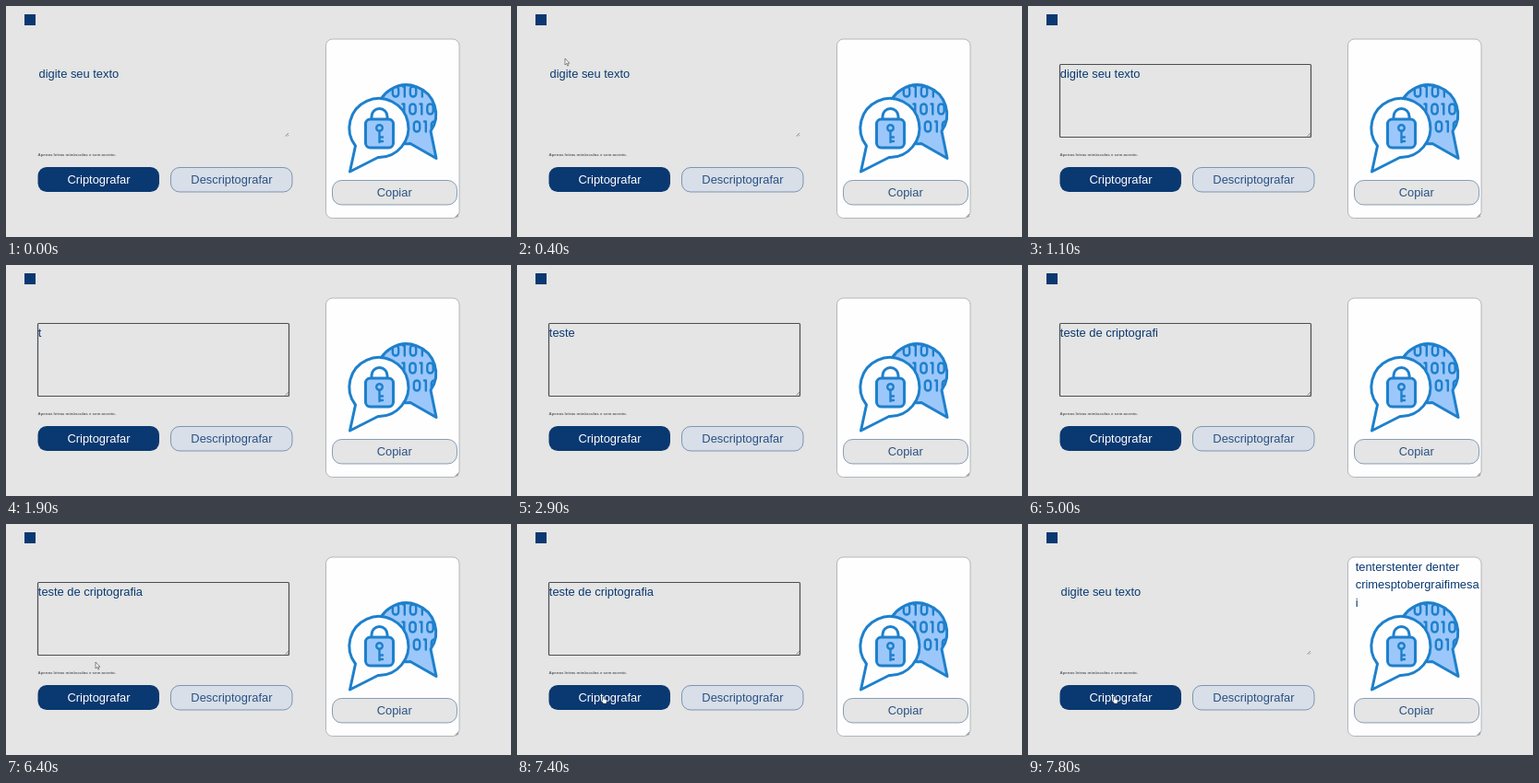
These frames come from a looping animation (547 px wide and 251 px high, 8000 ms). An HTML page:

```html
<!DOCTYPE html>
<html lang="pt">
<head>
<meta charset="utf-8">
<title>Criptografar texto</title>
<style>
  html, body { margin: 0; width: 100%; height: 100%; overflow: hidden; background: #e4e5e4; }
  svg { display: block; width: 547px; height: 251px; }
  text { font: 12.9px "Liberation Sans", Arial, sans-serif; fill: #0a3871; }
  .mid { text-anchor: middle; }
  .soft { fill: #2a5084; }
  .note { font-size: 4.4px; font-weight: bold; fill: #5b6068; }
  .art { stroke: #1e80cc; stroke-width: 3; stroke-linejoin: round; stroke-linecap: round; }
  .thin { stroke-width: 2.4; fill: none; }
  .grip { stroke: #77797c; stroke-width: .8; fill: none; }
  .outline { stroke: #0a3871; stroke-width: .7; stroke-opacity: .65; }
</style>
</head>
<body>
<svg viewBox="0 0 547 251">
  <defs>
    <path id="backBubble" d="M438 149.500A32 32 0 1 1 460 136L466 165.500Z"/>
    <clipPath id="inBack"><use href="#backBubble"/></clipPath>
  </defs>
  <rect width="547" height="251" fill="#e4e5e4"/>
  <rect x="20" y="9" width="12" height="12" fill="#0a3871"/>

  <rect id="focus" x="34.500" y="63.500" width="272" height="79" rx="1" fill="none" stroke="#4c4d4f" stroke-width="1.200"/>
  <path class="grip" d="M302.500 141.500l3.500-3.500M304.700 141.500l1.300-1.300"/>
  <text id="entry" y="78"></text>
  <text class="note" x="34.500" y="162.600">Apenas letras minúsculas e sem acento.</text>

  <rect x="34.500" y="175" width="131.500" height="27" rx="9.500" fill="#0a3871"/>
  <text class="mid" x="100.500" y="192.600" style="fill:#fff">Criptografar</text>
  <rect class="outline" x="178.500" y="175.500" width="131.500" height="26.500" rx="9.500" fill="#d8dfe8"/>
  <text class="mid soft" x="244.400" y="192.600">Descriptografar</text>

  <rect x="346.500" y="36" width="144.500" height="194.500" rx="7" fill="#fefefe" stroke="#a4a8ae" stroke-width=".8"/>
  <path class="grip" d="M486.500 229.500l3.500-3.500M488.500 229.500l1.500-1.500"/>

  <g class="art">
    <use href="#backBubble" fill="#9cc7fa"/>
    <g id="bits" class="thin" clip-path="url(#inBack)"></g>
    <path fill="#fefefe" d="M378.500 152A32 32 0 1 1 403 164.500L372.500 180Z"/>
    <path fill="none" d="M396 122v-2a8.500 8.500 0 0 1 17 0v2"/>
    <rect x="389.500" y="123" width="30" height="31" rx="5" fill="#9cc7fa"/>
    <circle class="thin" cx="404.500" cy="132.500" r="3.300"/>
    <path class="thin" d="M404.500 136v12M405 142.500h3M405 147h3"/>
  </g>

  <g id="result">
    <text x="354.700" y="50.500">tenterstenter denter</text>
    <text x="354.700" y="70">crimesptobergraifimesa</text>
    <text x="354.700" y="89.500">i</text>
  </g>
  <rect class="outline" x="353.500" y="189.500" width="135" height="26.500" rx="10" fill="#e4e5e4"/>
  <text class="mid soft" x="420.700" y="206.700">Copiar</text>

  <path id="arrow" d="M0 0v7l1.600-1.500 1.200 2.600 1.100-.5-1.200-2.500h2.200z" fill="#f4f4f4" stroke="#444" stroke-width=".6"/>
  <path id="hand" d="M1.200.8q.8-.8 1.500 0v2.400l2.600.7q.8.3.6 1.200l-.7 3h-3.200l-2-2.800q0-1 1.200-.4z" fill="#fff" stroke="#222" stroke-width=".4"/>
</svg>
<script>
const LOOP = 8000, FOCUS = 1100, TYPING = 1900, SUBMIT = 7800;
const PLACEHOLDER = "digite seu texto";
const MESSAGE = "teste de criptografia";
// [time, characters typed]
const KEYS = [
  [1900, 1], [2000, 2], [2600, 3], [2900, 5], [3200, 7], [3300, 8],
  [3500, 10], [3600, 11], [3700, 12], [3800, 13], [4100, 14], [4200, 15],
  [4500, 16], [4700, 17], [4800, 18], [4900, 19], [5000, 20], [5200, 21]
];
// [time, x, y]
const ENTER = [[100, 14, 1], [400, 52, 57]];
const TO_BUTTON = [
  [6400, 97, 150], [6500, 106, 157], [6700, 74, 173], [6900, 46, 186],
  [7100, 89, 187], [7200, 89, 187], [7300, 91, 186], [7400, 91.5, 187]
];

const el = id => document.getElementById(id);
const show = (id, on) => el(id).setAttribute("visibility", on ? "visible" : "hidden");

function along(points, t) {
  const next = points.findIndex(p => p[0] > t);
  if (next < 0) return points[points.length - 1].slice(1);
  const [t0, x0, y0] = points[next - 1], [t1, x1, y1] = points[next];
  const k = (t - t0) / (t1 - t0);
  return [x0 + (x1 - x0) * k, y0 + (y1 - y0) * k];
}

// Rows of large binary digits, cut off by the bubble's edge.
function drawBits() {
  const rows = [[422, 93, "0101"], [431, 112, "1010"], [445, 131, "010"]];
  el("bits").innerHTML = rows.map(([x, y, bits]) => [...bits].map((bit, i) => {
    const cx = x + i * 9.5;
    return bit === "0"
      ? `<rect x="${cx - 3.2}" y="${y - 5.5}" width="6.4" height="11" rx="3.2"/>`
      : `<path d="M${cx - 1.5} ${y - 5.5}h1.8v11"/>`;
  }).join("")).join("");
}

function render(time) {
  const t = Math.floor(time / 100) * 100;
  const typed = KEYS.reduce((n, [at, count]) => t >= at ? count : n, 0);
  const submitted = t >= SUBMIT;
  const focused = t >= FOCUS && !submitted;
  el("entry").textContent = t < TYPING || submitted ? PLACEHOLDER : MESSAGE.slice(0, typed);
  el("entry").setAttribute("x", focused ? 34.8 : 35.5);
  show("focus", focused);
  show("result", submitted);

  const entering = t >= 100 && t < FOCUS;
  const leaving = t >= 6400;
  const [x, y] = entering ? along(ENTER, t) : leaving ? along(TO_BUTTON, t) : [0, 0];
  const overButton = leaving && y >= 175;
  show("arrow", entering || leaving && !overButton);
  show("hand", overButton);
  for (const id of ["arrow", "hand"]) el(id).setAttribute("transform", `translate(${x} ${y})`);
}

const start = performance.now();
function tick() {
  render((performance.now() - start) % LOOP);
  requestAnimationFrame(tick);
}
drawBits();
tick();
</script>
</body>
</html>
```
